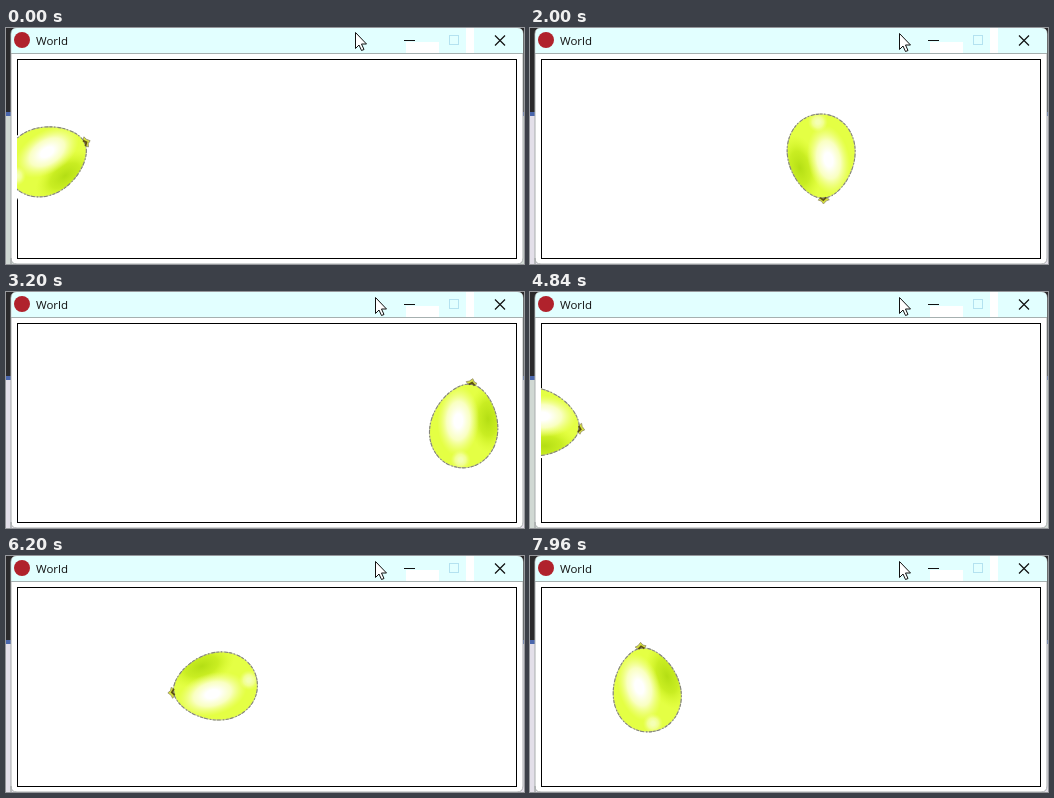
An HTML page that plays this animation: 518 px wide and 236 px high, repeating every 8 s.

```html
<!DOCTYPE html>
<html lang="en">
<head>
<meta charset="utf-8">
<title>World</title>
<style>
  html, body { margin: 0; width: 100%; height: 100%; overflow: hidden; background: #fff; }
  svg { display: block; width: 518px; height: 236px; }
  text { font: 11.5px "Open Sans", "Noto Sans", sans-serif; fill: #111; }
</style>
</head>
<body>
<svg viewBox="0 0 518 236" width="518" height="236">
  <defs>
    <clipPath id="scene"><rect x="11" y="31" width="500" height="200"/></clipPath>
    <clipPath id="skin"><use href="#egg"/></clipPath>
    <path id="egg" d="M0-45C20-45 34-28 34-8C34 14 18 36 3 39H-3C-18 36-34 14-34-8C-34-28-20-45 0-45Z"/>
    <radialGradient id="shine">
      <stop offset=".2" stop-color="#fff"/>
      <stop offset=".55" stop-color="#fdffd8" stop-opacity=".85"/>
      <stop offset="1" stop-color="#f4ff90" stop-opacity="0"/>
    </radialGradient>
    <radialGradient id="shade">
      <stop offset="0" stop-color="#b4de14"/>
      <stop offset=".5" stop-color="#c4ea1c" stop-opacity=".85"/>
      <stop offset="1" stop-color="#d8f82c" stop-opacity="0"/>
    </radialGradient>
  </defs>

  <!-- desktop behind the window -->
  <rect width="518" height="84" fill="#2b2a2c"/>
  <rect y="84" width="518" height="4" fill="#4a66ac"/>
  <rect id="desk" y="88" width="518" height="148"/>

  <!-- window -->
  <path d="M5 236V6Q5 0 11 0H511Q517 0 517 6V230Q517 236 511 236H11Q5 236 5 230Z" fill="#fff" stroke="#a9adad"/>
  <path d="M5.5 25V6Q5.5 0 11 0H511Q517 0 517 6V25Z" fill="#e2ffff"/>
  <path d="M400 14h33v11h-33zM460 0h8v25h-8z" fill="#fff"/>
  <path d="M5 25.5H517" stroke="#a6b0b0"/>
  <circle cx="16" cy="12" r="8" fill="#b0222c"/>
  <text x="30" y="17">World</text>
  <path d="M398 12.5H409M489 7.500L499 17.500M499 7.500L489 17.500" fill="none" stroke="#111" stroke-width="1.2"/>
  <rect x="443.500" y="7.500" width="9" height="9" fill="none" stroke="#b4e2f0"/>

  <!-- scene -->
  <rect x="11.500" y="31.500" width="499" height="199" fill="#fff" stroke="#000"/>
  <g clip-path="url(#scene)">
    <g id="balloon">
      <rect x="-34.500" y="-45" width="69" height="90" fill="#fff"/>
      <path d="M-2 37L-5 41L-2 42L0 45L3 42L6 41L2 37Z" fill="#d6e23c" stroke="#98906a" stroke-width=".8"/>
      <use href="#egg" fill="#e4ff44"/>
      <g clip-path="url(#skin)">
        <ellipse cx="-22" cy="8" rx="19" ry="34" fill="url(#shade)" transform="rotate(-12 -22 8)"/>
        <ellipse cx="7" cy="1" rx="21" ry="35" fill="url(#shine)" transform="rotate(-8 7 1)"/>
        <ellipse cx="-2" cy="-37" rx="10" ry="10" fill="url(#shine)" opacity=".6"/>
      </g>
      <use href="#egg" fill="none" stroke="#c4c8a0" stroke-width=".8"/>
      <use href="#egg" fill="none" stroke="#85857c" stroke-width="1.1" stroke-dasharray="3 1.500 1.500 2 4 1"/>
      <path d="M-3 38.500L0 41L3 38.500" fill="none" stroke="#5c5014" stroke-width="1.800"/>
    </g>
  </g>

  <path id="cursor" d="M.5.5V16.500L4 13L6.500 18.500L9 17.500L6.500 12H11.500Z" fill="#fff" stroke="#111"/>
</svg>
<script>
  const LOOP = 8000;
  const $ = id => document.getElementById(id);

  // Drifts right; the balloon restarts at the left edge twice per loop.
  const drift = [
    [0, 43], [1120, 177.5], [2000, 291.5], [3200, 459], [4810, 690],
    [4811, 6], [6200, 206.5], [7200, 346],
    [7201, 8], [LOOP, 122]
  ];

  function along(points, t) {
    let i = 1;
    while (i < points.length - 1 && t > points[i][0]) i++;
    const [t0, a] = points[i - 1], [t1, b] = points[i];
    return a + (b - a) * (t - t0) / (t1 - t0);
  }

  function ease(t, from, to) {
    const p = Math.min(1, Math.max(0, (t - from) / (to - from)));
    return p * p * (3 - 2 * p);
  }

  function draw(t) {
    // One degree of turn for each pixel travelled.
    const x = along(drift, t);
    $("balloon").setAttribute("transform", `translate(${x} 131) rotate(${-71 - x})`);

    const m = ease(t, 80, 700);
    $("cursor").setAttribute("transform", `translate(${349 + 20 * m} ${4 + m})`);

    const green = t < 700 || (t > 4300 && t < 5500);
    $("desk").setAttribute("fill", green ? "#d0d8d3" : "#e3dfe9");
  }

  let start;
  function tick(now) {
    start ??= now;
    draw((now - start) % LOOP);
    requestAnimationFrame(tick);
  }
  draw(0);
  requestAnimationFrame(tick);
</script>
</body>
</html>
```
